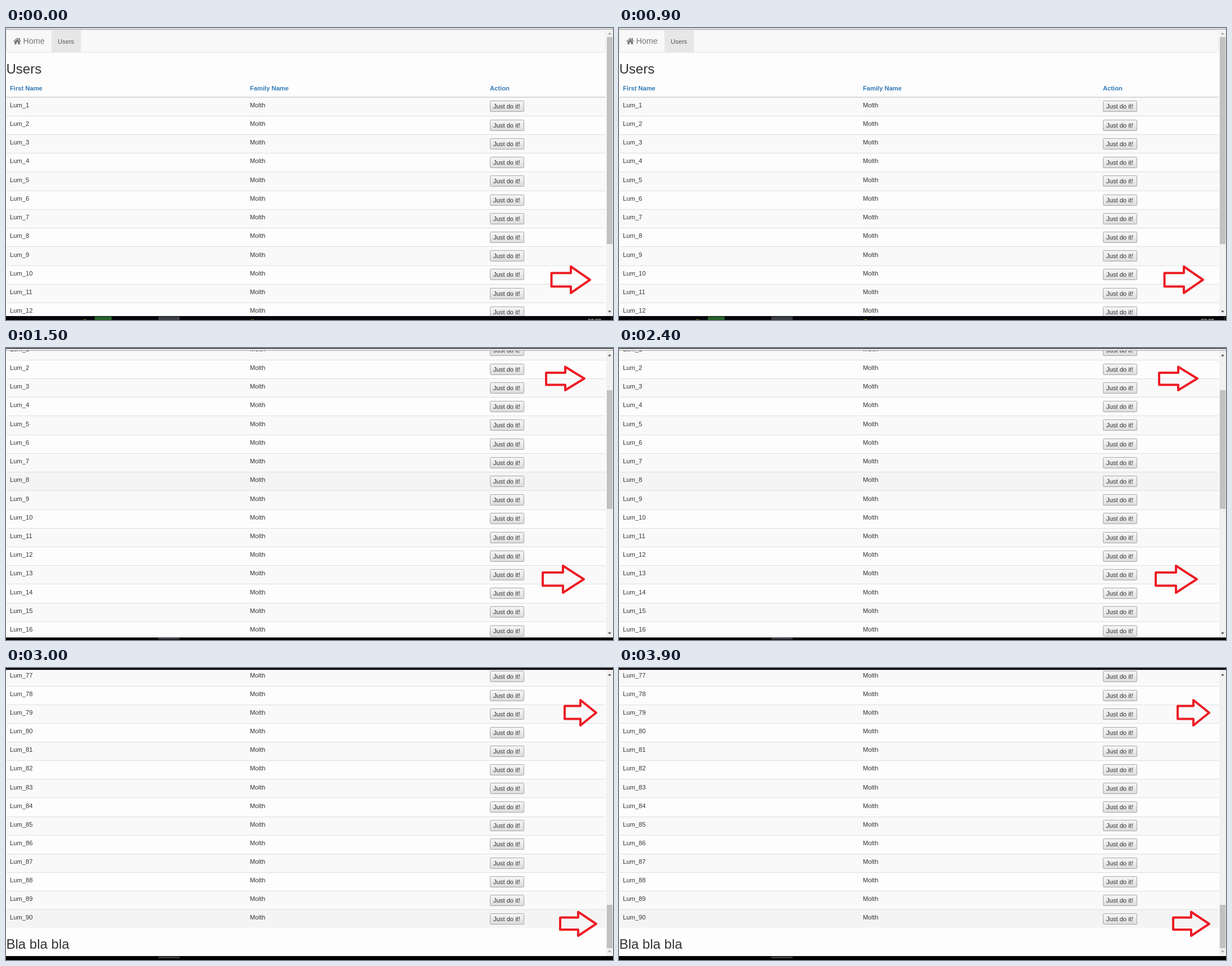
Recreate the animation shown at these times as an HTML page. Size 1080 by 519 pixels, loop 4500 ms.

```html
<!DOCTYPE html>
<html lang="en">
<head>
<meta charset="utf-8">
<title>Users table</title>
<style>
  html, body { margin: 0; width: 100%; height: 100%; overflow: hidden; background: #fdfdfd; }
  svg { display: block; width: 1080px; height: 519px; }
  text { font: 11.2px "Liberation Sans", Arial, sans-serif; fill: #333; white-space: pre; }
  .head { font-weight: bold; fill: #337ab7; }
  .title { font-size: 24px; }
  .brand { font-size: 14.3px; fill: #777; }
  .nav { fill: #555; }
  .clock { font-size: 9.5px; fill: #fff; }
  .arrow { fill: none; stroke: #ed1c24; stroke-width: 4; stroke-linejoin: round; }
</style>
</head>
<body>
<svg id="stage" viewBox="0 0 1080 519" xmlns="http://www.w3.org/2000/svg">
  <defs>
    <linearGradient id="face" x2="0" y2="1">
      <stop stop-color="#f6f6f6"/><stop offset="1" stop-color="#dcdcdc"/>
    </linearGradient>
  </defs>
</svg>
<script>
const SCENE_MS = 1500;
const COLUMNS = [7, 434, 861];

const rect = (x, y, w, h, fill, extra = '') =>
  `<rect x="${x}" y="${y}" width="${w}" height="${h}" fill="${fill}" ${extra}/>`;
const text = (x, y, str, cls = '') => `<text x="${x}" y="${y}" class="${cls}">${str}</text>`;
const path = (d, fill) => `<path d="${d}" fill="${fill}"/>`;

function button(y) {
  return rect(861.5, y + .5, 60, 19, 'url(#face)', 'stroke="#a6a6a6" rx="1"') +
    text(867, y + 14, 'Just do it!');
}

function rows({ first, last, top, pitch, hover }) {
  let out = '';
  for (let n = first; n <= last; n++) {
    const exact = top + (n - first) * pitch;
    const y = Math.round(exact);
    const end = Math.round(exact + pitch);
    const baseline = Math.round(exact + 18.2);
    const fill = n === hover ? '#f4f4f4' : n % 2 ? '#f9f9f9' : '#fdfdfd';
    out += rect(1, y, 1066, end - y, fill) + rect(1, y, 1066, 1, '#dfdfdf') +
      text(COLUMNS[0], baseline, 'Lum_' + n) + text(COLUMNS[1], baseline, 'Molth') +
      button(Math.round(exact + 6.8));
  }
  return out;
}

function header() {
  return rect(.5, 3.5, 1066, 40, '#f8f8f8', 'stroke="#e7e7e7" rx="3"') +
    rect(81, 4, 52.5, 39.5, '#e7e7e7') +
    path('M13 23.6 20 17.2 22.8 19.7V18H24.8V21.5L27 23.6 26.2 24.5 20 19 13.8 24.5Z' +
         'M15.2 24.2 20 20 24.8 24.2V29H21.4V25.5H18.6V29H15.2Z', '#777') +
    text(30.5, 28, 'Home', 'brand') + text(92, 28, 'Users', 'nav') +
    text(.5, 81, 'Users', 'title') +
    ['First Name', 'Family Name', 'Action'].map((s, i) => text(COLUMNS[i], 111, s, 'head')).join('');
}

function scrollbar({ thumb, up, down }) {
  const [from, to] = thumb;
  const tri = (y, dir, on) =>
    path(`M1071 ${y + 1.5 * dir}h6l-3 ${-3.5 * dir}z`, on ? '#505050' : '#a3a3a3');
  return rect(1068, 0, 12, 519, '#f1f1f1') + rect(1069, from, 10, to - from, '#c1c1c1') +
    tri(up[0], 1, up[1]) + tri(down[0], -1, down[1]);
}

// An arrow: tail, neck and tip across; head top, shaft top, shaft bottom, head bottom down.
function arrow([tail, neck, tip, top, upper, lower, bottom]) {
  return `<path class="arrow" d="M${tail} ${upper}H${neck}V${top}L${tip} ${(top + bottom) / 2}` +
    ` ${neck} ${bottom}V${lower}H${tail}Z"/>`;
}

const scenes = [
  {
    table: { first: 1, last: 12, top: 122.6, pitch: 33.22 },
    before: header(),
    after: rect(1, 122, 1066, 1.5, '#d8d8d8'),
    bar: { thumb: [16, 384], up: [10, false], down: [504, true] },
    arrows: [[970.5, 1005, 1039, 424, 435.5, 459.5, 471]],
    frame: rect(0, 0, 1080, 2, '#dedede') + rect(0, 2, 1080, 1, '#b0b0b0') +
      rect(0, 512, 1080, 7, '#04060a') + rect(158, 513, 30, 6, '#25602a') +
      rect(271, 513, 38, 6, '#3b3d44') + rect(137, 518, 6, 1, '#8a6a20') +
      rect(436, 518, 5, 1, '#8a6a20') + rect(1077, 513, 1, 6, '#444') +
      text(1035, 523, '23:08', 'clock')
  },
  {
    table: { first: 1, last: 16, top: -12.4, pitch: 33.22, hover: 8 },
    bar: { thumb: [75, 286], up: [13, true], down: [507, true] },
    arrows: [[961, 995, 1029, 33.5, 44, 65.5, 75], [955, 991, 1028, 387, 399, 422.5, 435]],
    frame: rect(0, 0, 1080, 1.3, '#000') + rect(0, 1.3, 1080, 3, '#e2e2e2') +
      rect(0, 4, 1080, 1, '#b0b0b0') +
      rect(0, 514.5, 1080, 4.5, '#000') + rect(271, 515, 38, 3, '#3b3d44')
  },
  {
    table: { first: 77, last: 90, top: -1.4, pitch: 33.12, hover: 90 },
    after: text(.5, 499, 'Bla bla bla', 'title'),
    bar: { thumb: [421, 498], up: [12, true], down: [504, false] },
    arrows: [[994, 1022, 1050, 57, 67.5, 90.5, 102], [986, 1018, 1050, 433.5, 443.5, 465, 476]],
    frame: rect(0, 0, 1080, 3, '#000') + rect(0, 3, 1080, 1, '#c4b0bd') +
      rect(0, 512, 1080, 7, '#000') + rect(271, 513, 38, 3, '#3b3d44')
  }
];

const stage = document.getElementById('stage');
scenes.forEach((scene, index) => {
  const group = document.createElementNS(stage.namespaceURI, 'g');
  group.innerHTML = rect(0, 0, 1080, 519, '#fdfdfd') + (scene.before || '') + rows(scene.table) +
    (scene.after || '') + scrollbar(scene.bar) + scene.arrows.map(arrow).join('') + scene.frame;
  stage.append(group);
  const steps = [0, 1, 2, 2].map((shown, i) => ({
    opacity: shown === index ? 1 : 0, offset: i / 3, easing: 'step-end'
  }));
  group.animate(steps, { duration: SCENE_MS * scenes.length, iterations: Infinity });
});
</script>
</body>
</html>
```
